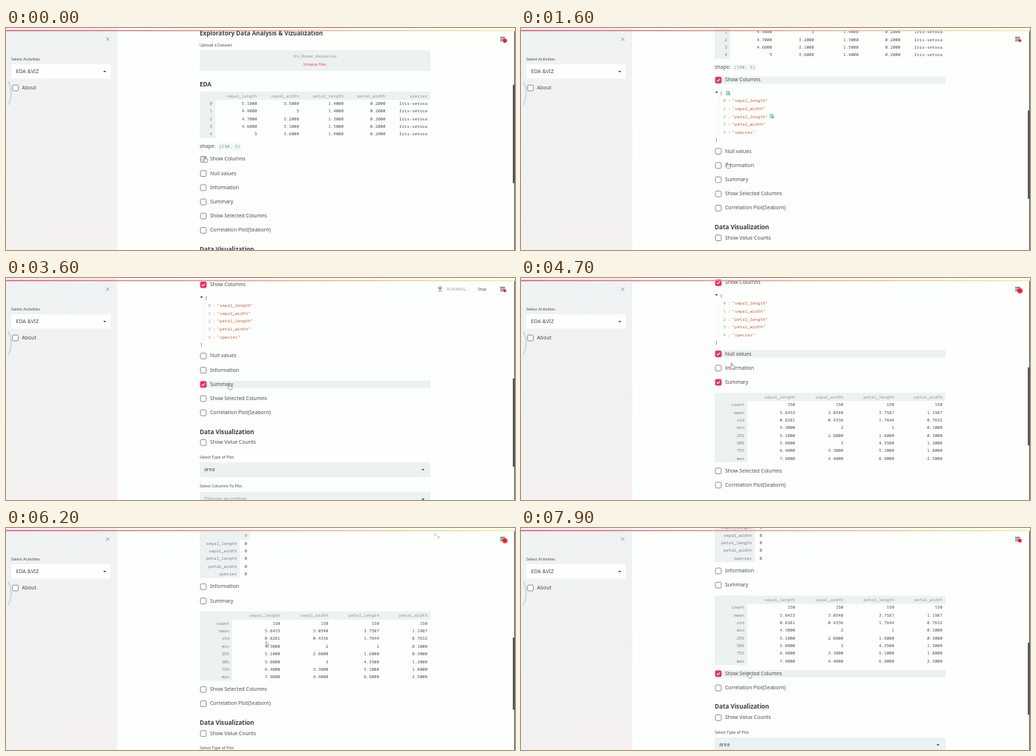
Write an HTML page with a canvas that moves like this. It is 686x300 px and loops after 8 s.

```html
<!DOCTYPE html>
<html lang="en">
<head>
<meta charset="utf-8">
<title>Exploratory Data Analysis</title>
<style>
html, body { margin: 0; width: 100%; height: 100%; overflow: hidden; background: #fdfffd; }
canvas { display: block; width: 686px; height: 300px; }
</style>
</head>
<body>
<canvas id="stage"></canvas>
<script>
const LOOP = 8000, W = 686, H = 300;
const canvas = document.getElementById('stage');
const c = canvas.getContext('2d');
const dpr = window.devicePixelRatio || 1;
canvas.width = W * dpr;
canvas.height = H * dpr;

const SANS = '"Noto Sans", "Open Sans", sans-serif';
const MONO = '"Noto Sans Mono", "Liberation Mono", monospace';
const INK = '#4a4c52', MUTED = '#92979b', PANEL = '#ecf1f1', PINK = '#ee2a60';
const LEFT = 261, RIGHT = 572;

const COLUMNS = ['sepal_length', 'sepal_width', 'petal_length', 'petal_width', 'species'];
const HEAD = [
  '0 5.1000 3.5000 1.4000 0.2000 Iris-setosa',
  '1 4.9000 3 1.4000 0.2000 Iris-setosa',
  '2 4.7000 3.2000 1.3000 0.2000 Iris-setosa',
  '3 4.6000 3.1000 1.5000 0.2000 Iris-setosa',
  '4 5 3.6000 1.4000 0.2000 Iris-setosa'
];
const SUMMARY = [
  'count 150 150 150 150',
  'mean 5.8433 3.0540 3.7587 1.1987',
  'std 0.8281 0.4336 1.7644 0.7632',
  'min 4.3000 2 1 0.1000',
  '25% 5.1000 2.8000 1.6000 0.3000',
  '50% 5.8000 3 4.3500 1.3000',
  '75% 6.4000 3.3000 5.1000 1.8000',
  'max 7.9000 4.4000 6.9000 2.5000'
];
const NULLS = COLUMNS.map(name => name + ' 0');

// Keys: time, then values
const SCROLL = [[0, 0], [300, 0], [500, 18], [1000, 18], [1600, 106.7], [1800, 168.2], [3900, 168.2],
  [4100, 171], [5500, 171], [6000, 283.4], [7300, 283.4], [7500, 304.8], [8000, 304.8]];
const POINTER = [[0, 269, 178], [300, 269, 178], [500, 288, 178], [900, 300, 180], [1300, 300, 160],
  [1500, 300, 122], [1600, 279, 186], [1800, 278, 150], [2000, 264, 142], [2300, 235, 150],
  [2600, 265, 182], [2700, 271, 182], [3000, 295, 201], [3300, 302, 147], [3700, 302, 147],
  [4300, 269, 105], [4500, 269, 104], [4700, 285, 119], [5000, 222, 185], [5300, 266, 198],
  [5400, 280, 190], [5800, 340, 150], [6200, 352, 157], [6600, 370, 190], [7200, 320, 207],
  [7500, 308, 199], [8000, 308, 199]];

function at(keys, t) {
  const i = keys.findIndex(k => k[0] > t);
  const a = keys[i - 1], b = keys[i];
  const p = (t - a[0]) / (b[0] - a[0]);
  return a.slice(1).map((v, n) => v + (b[n + 1] - v) * p);
}

function text(str, x, y, size = 6.9, color = INK, align = 'left', family = SANS, weight = 400) {
  c.font = `${weight} ${size}px ${family}`;
  c.textAlign = align;
  c.fillStyle = color;
  c.fillText(str, x, y);
}
const mono = (str, x, y, color = INK, align = 'right') => text(str, x, y, 5.75, color, align, MONO);
const heading = (str, y) => text(str, LEFT, y, 8.1, '#3a3c43', 'left', SANS, 600);

function rect(x, y, w, h, color, r = 0) {
  c.fillStyle = color;
  c.beginPath();
  c.roundRect(x, y, w, h, r);
  c.fill();
}

function line(points, color, width = 1) {
  c.strokeStyle = color;
  c.lineWidth = width;
  c.beginPath();
  points.forEach(([x, y]) => c.lineTo(x, y));
  c.stroke();
}

function caret(x, y, s = 2) {
  c.fillStyle = '#30323a';
  c.beginPath();
  c.moveTo(x - s, y - s / 2);
  c.lineTo(x + s, y - s / 2);
  c.lineTo(x, y + s / 2);
  c.fill();
}

function box(x, y, on, hover) {
  c.beginPath();
  c.roundRect(x - 3.9, y - 3.9, 7.8, 7.8, 1.4);
  c.fillStyle = on ? PINK : hover ? '#dfe3e6' : '#fdfefe';
  c.fill();
  c.strokeStyle = on ? PINK : '#8b8e93';
  c.lineWidth = 1;
  c.stroke();
  if (on) line([[x - 2, y], [x - 0.5, y + 1.6], [x + 2.2, y - 1.7]], '#fff', 1.1);
}

function check(label, y, on, focus, hover) {
  if (focus) rect(LEFT, y - 5, RIGHT - LEFT, 10, PANEL);
  box(266, y, on, hover);
  text(label, 275, y);
}

function table(y, rows, names, edges, indexWidth, indexEdge, width) {
  const step = 10.35, mid = y + 6;
  rect(LEFT, y, width, 11, PANEL);
  rect(LEFT, y, indexWidth, 11 + step * rows.length, PANEL);
  names.forEach((name, i) => mono(name, edges[i], mid, MUTED));
  rows.forEach((row, r) => row.split(' ').forEach((cell, i) => {
    const ry = mid + step * (r + 1);
    if (i) mono(cell, edges[i - 1], ry);
    else mono(cell, indexEdge, ry, '#7d8289');
  }));
}

function copyIcon(x, y) {
  c.strokeStyle = '#6fb0cc';
  c.lineWidth = 0.9;
  c.strokeRect(x - 2.3, y - 2.6, 3.6, 4.6);
  c.strokeRect(x - 0.5, y - 0.4, 3, 2.8);
}

function list(y, hover) {
  caret(263.5, y - 1, 2);
  mono('[', 270, y, INK, 'center');
  line([[266.5, y + 6], [266.5, y + 58]], '#f1f3f2', 0.8);
  COLUMNS.forEach((name, i) => {
    const ry = y + 10.6 * (i + 1);
    mono(i, 272.5, ry, '#a3a19a', 'left');
    mono(':', 278.5, ry, '#6d6f74', 'left');
    mono(`"${name}"`, 284.5, ry, '#cf5a3d', 'left');
  });
  mono(']', 263.5, y + 63, INK, 'center');
  if (hover) {
    copyIcon(279, y);
    copyIcon(338, y + 31);
  }
}

function select(label, value, y, color) {
  text(label, LEFT, y, 5.4);
  rect(LEFT, y + 7.1, RIGHT - LEFT, 20, PANEL, 1.5);
  text(value, 267, y + 17.1, 6.9, color);
  caret(562, y + 17.1);
}

function page(t) {
  const scroll = at(SCROLL, t)[0];
  const focus = t < 300 ? '' : t < 3400 ? 'cols' : t < 4400 ? 'sum' : t < 7700 ? 'null' : 'sel';
  const showCols = t >= 700, showSum = t >= 3800, showNull = t >= 4900;
  const height = 677 + 77 * showCols + 100.5 * showSum + 70 * showNull;

  c.save();
  c.translate(0, -scroll);
  heading('Exploratory Data Analysis & Vizualization', 8);
  text('Upload a Dataset', LEFT, 23.3, 5.4);
  rect(LEFT, 30, RIGHT - LEFT, 28, PANEL, 1.5);
  text('Iris_flower_dataset.csv', 416.5, 38.7, 5.55, MUTED, 'center');
  text('browse files', 416.5, 49.5, 5.55, '#ee4b70', 'center');
  heading('EDA', 76.8);
  table(86, HEAD, COLUMNS, [338.5, 395, 455, 511.5, 568], 21, 278, RIGHT - LEFT);
  text('shape:', LEFT, 160.5);
  rect(285, 155.5, 33, 9.5, '#f4f8f6', 1);
  text('(150, 5)', 287, 160.7, 6, t < 300 ? '#45a587' : '#76908a', 'left', MONO);

  let y = 177.4;
  check('Show Columns', y, t >= 300, focus === 'cols', t < 300);
  if (showCols) {
    list(y + 17.7, t >= 1300 && t < 1700);
    y += 77;
  }
  y += 19.2;
  check('Null values', y, t >= 4400, focus === 'null');
  if (showNull) {
    table(y + 14.5, NULLS, ['0'], [325], 54, 311, 68);
    if (t >= 5800 && t < 6500) {
      const ey = y + 20.5;
      line([[578, ey - 0.5], [578, ey - 2.5], [580, ey - 2.5]], '#9ca1a6', 0.9);
      line([[583.5, ey + 0.5], [583.5, ey + 2.5], [581.5, ey + 2.5]], '#9ca1a6', 0.9);
      line([[578, ey - 2.5], [583.5, ey + 2.5]], '#c4c8cc', 0.7);
    }
    y += 70;
  }
  y += 19.2;
  check('Information', y);
  y += 19.2;
  check('Summary', y, t >= 3400 && t < 4900, focus === 'sum');
  if (showSum) {
    table(y + 14.2, SUMMARY, COLUMNS.slice(0, 4), [369.5, 434.5, 503, 568], 44, 301, RIGHT - LEFT);
    y += 100.5;
  }
  y += 19.2;
  check('Show Selected Columns', y, t >= 7700, focus === 'sel');
  y += 19.2;
  check('Correlation Plot(Seaborn)', y);
  heading('Data Visualization', y + 26);
  check('Show Value Counts', y + 40.2);
  select('Select Type of Plot', 'area', y + 60, INK);
  select('Select Columns To Plot', 'Choose an option', y + 99.6, MUTED);
  c.restore();

  rect(685, 4, 1, H, '#55585a');
  rect(683, (scroll + 173) * H / height, 2.5, H * H / height, '#55585a');
}

function sidebar() {
  const g = c.createLinearGradient(0, 0, 30, H);
  g.addColorStop(0, '#f0f3f3');
  g.addColorStop(0.55, '#eff2f1');
  g.addColorStop(1, '#f4f1f0');
  rect(0, 0, 150, H, g);
  line([[134.7, 12.7], [139.5, 17.5]], '#9a9da1', 0.9);
  line([[139.5, 12.7], [134.7, 17.5]], '#9a9da1', 0.9);
  text('Select Activities', 7, 42, 5.4);
  rect(7, 49, 134, 19.5, '#fefefe', 1.5);
  text('EDA &VIZ', 13.5, 59, 7);
  caret(133, 59);
  box(12.7, 81, false);
  text('About', 21.5, 81);
  c.strokeStyle = '#d6dadb';
  c.lineWidth = 2;
  c.beginPath();
  c.moveTo(3, 72);
  c.quadraticCurveTo(11, 88, 3, 104);
  c.stroke();
}

function toolbar(t) {
  const g = c.createLinearGradient(0, 0, W, 0);
  g.addColorStop(0, '#ee4c78');
  g.addColorStop(1, '#f3ee90');
  rect(0, 2.7, W, 1.5, g);

  if (t >= 3500 && t < 3800) {
    const gray = '#8b9095';
    rect(584, 10.8, 2, 2, gray, 1);
    line([[581.5, 13.4], [588.5, 13.4]], gray);
    line([[585, 13.4], [585, 15.5]], gray, 2);
    line([[583, 19], [585, 15], [587, 19]], gray);
    text('RUNNING...', 594, 15.2, 5.4, '#9a9ea3');
    text('Stop', 636, 15, 5.4);
  }
  for (const y of [12.6, 14.9, 17.2]) line([[666, y], [672.5, y]], '#4a4c52', 1.1);

  const pulse = Math.sin(t / 1000 * Math.PI);
  const dot = c.createRadialGradient(672.4, 17.2, 0, 672.4, 17.2, 3.7 + 1.3 * pulse);
  dot.addColorStop(0, '#f01832');
  dot.addColorStop(0.5, '#f01832');
  dot.addColorStop(1, 'rgba(240,24,50,0)');
  c.fillStyle = dot;
  c.fillRect(666, 11, 13, 13);
}

const HAND = new Path2D('M-1.8-4.5Q-1-5.3-.3-4.5L-.3-1.5 2.4-1Q3.6-.6 3.5.7L3 4.5H-1.2L-3.7 1Q-3.2-.2-1.8.7Z');
const ARROW = new Path2D('M-2-4.5V3L-.3 1.5 .8 4.3 2 3.8 .9 1.1H3.2Z');

function pointer(t) {
  const [x, y] = at(POINTER, t);
  c.save();
  c.translate(x, y);
  c.scale(0.85, 0.85);
  const shape = t > 5600 && t < 7200 ? ARROW : HAND;
  c.fillStyle = '#fff';
  c.fill(shape);
  c.strokeStyle = '#74777b';
  c.lineWidth = 0.8;
  c.stroke(shape);
  c.restore();
}

function draw(now) {
  const t = now % LOOP;
  c.setTransform(dpr, 0, 0, dpr, 0, 0);
  c.textBaseline = 'middle';
  rect(0, 0, W, H, '#fdfffd');
  page(t);
  sidebar();
  toolbar(t);
  pointer(t);
}

const start = performance.now();
function frame() {
  draw(performance.now() - start);
  requestAnimationFrame(frame);
}
frame();
</script>
</body>
</html>
```
